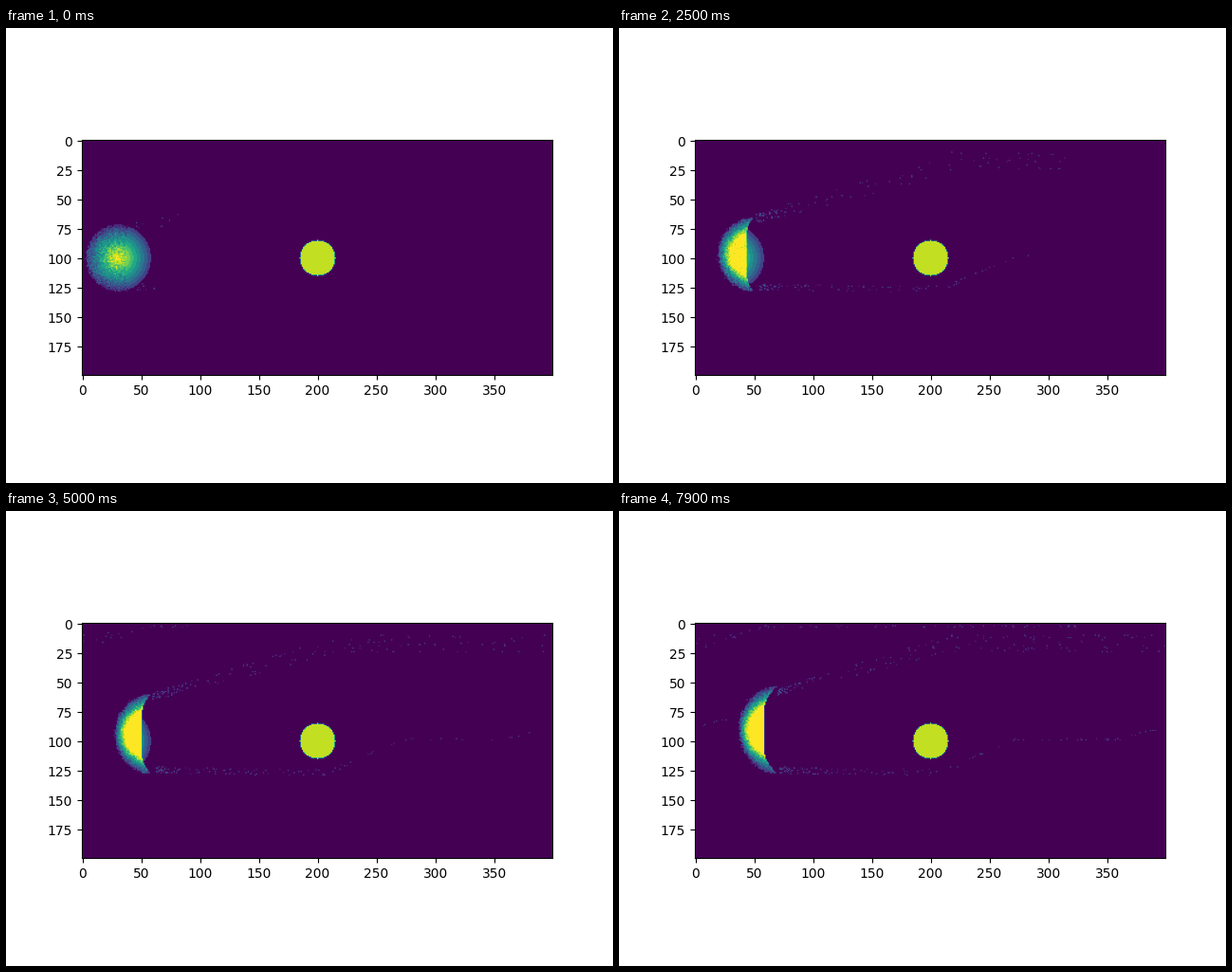
A matplotlib script that plays this animation: 640 px wide and 480 px high, repeating every 8000 ms.

```python
import numpy as np
import matplotlib.pyplot as plt
from matplotlib.animation import FuncAnimation

W, H, FRAMES, STEP = 400, 200, 80, 100
SPAN = 2 * W
X, Y = np.meshgrid(np.arange(W), np.arange(H))

# round obstacle and the starting sand cone
ROCK = np.hypot(X - 200, Y - 100) <= 15
R = np.hypot(X - 30, Y - 100)
CONE = np.where(R < 28.2, 10.4 - 0.33 * R, 0)


def ramp(s, start, length):
    return np.clip((s - start) / length, 0, 1)


def settle(t, tau):
    return 1 - np.exp(-t / tau)


def make_grains(n, seed):
    rng = np.random.default_rng(seed)
    return (rng.uniform(0, SPAN, n), rng.beta(0.5, 0.5, n),
            rng.integers(1, 3, n), rng.random(n))


UPPER = make_grains(300, 3)
LOWER = make_grains(300, 8)


def upper_path(s, lane, t):
    y = 10 + 52 * (1 - ramp(s, 50, 168)) - 8 * ramp(s, 400, 60)
    spread = 4 + 10 * ramp(s, 50, 170) - 13 * ramp(s, 400, 60)
    early = 10 * np.exp(-t / 2.2) * (1 - ramp(s, 180, 60))
    return y + lane * (spread + early) + 0.4 * early


def lower_path(s, lane, t):
    y = 122 + 2 * ramp(s, 50, 110) - 26 * ramp(s, 212, 62) - 18 * ramp(s, 360, 70)
    return y + lane * (5 - 4 * ramp(s, 212, 20))


def drop(field, s, y, level):
    ix = s.astype(int) % W
    iy = np.clip(np.round(y).astype(int), 0, H - 1)
    field[iy, ix] = np.maximum(field[iy, ix], level)


def trail(field, rng, grains, path, f, t, tip, front, thin_from):
    """Grains drifting from a horn tip to the front, denser near the tip."""
    s, lane, level, chance = grains
    s = (s + 7 * f) % SPAN
    density = min(1, 0.25 + 0.6 * t) * np.where(s > thin_from, 0.5, 1)
    on = (s > tip) & (s < front) & (chance < density)
    drop(field, s[on], path(s[on], lane[on], t), level[on])

    n = int(4 + 30 * min(1, t))
    s = tip + rng.exponential(9, n)
    drop(field, s, path(s, rng.random(n), t), rng.integers(1, 4, n))


def dune(t, rng):
    dist = np.abs(Y - 100 + 1.2 * t)
    left = 3 + 3.2 * t + 8.7 * settle(t, 0.8)
    rx, ry = 28 + 0.6 * t, 28.5 + 1.1 * t
    outer = left + rx * (1 - np.sqrt(np.clip(1 - (dist / ry) ** 2, 0, 1)))
    inner = 37 + 2.75 * t + 0.03 * np.maximum(0, dist - 18) ** 2

    # windward slope steepens while the cone wears down
    slope = (0.4 + 0.85 * settle(t, 3)) * np.exp(-(dist / 24) ** 2)
    wind = np.minimum(slope * (X - outer) + 1.5, min(9 + 0.7 * t, 13))
    k = settle(t, 0.45)
    body = (1 - k) * CONE + k * wind
    rough = np.round(body + rng.normal(0, 0.75, X.shape))
    ragged = outer + rng.normal(0, 0.9, X.shape)
    inside = (X > ragged) & (X < inner) & (dist < ry)
    sand = np.where(inside, np.maximum(rough, 0), 0)

    # the sheltered side keeps its smooth steps
    lee = (X >= inner) & (dist < 24 + 10 * np.exp(-t / 0.4))
    return np.where(lee, np.ceil(CONE), sand)


def scene(f):
    t = f * STEP / 1000
    rng = np.random.default_rng(100 + f)
    field = dune(t, rng)
    trail(field, rng, UPPER, upper_path, f, t, 44 + 3.3 * t,
          82 + 75 * t + 50 * settle(t, 0.5), 430)
    trail(field, rng, LOWER, lower_path, f, t, 47 + 3.2 * t,
          65 + 390 * settle(t, 3), 220)
    field[ROCK] = 9.1
    return field


fig, ax = plt.subplots(figsize=(6.4, 4.8), dpi=100)
image = ax.imshow(scene(0), cmap="viridis", vmin=0, vmax=10)


def update(f):
    image.set_data(scene(f))
    return (image,)


anim = FuncAnimation(fig, update, frames=FRAMES, interval=STEP,
                     repeat=True, repeat_delay=0)
plt.show()
```
